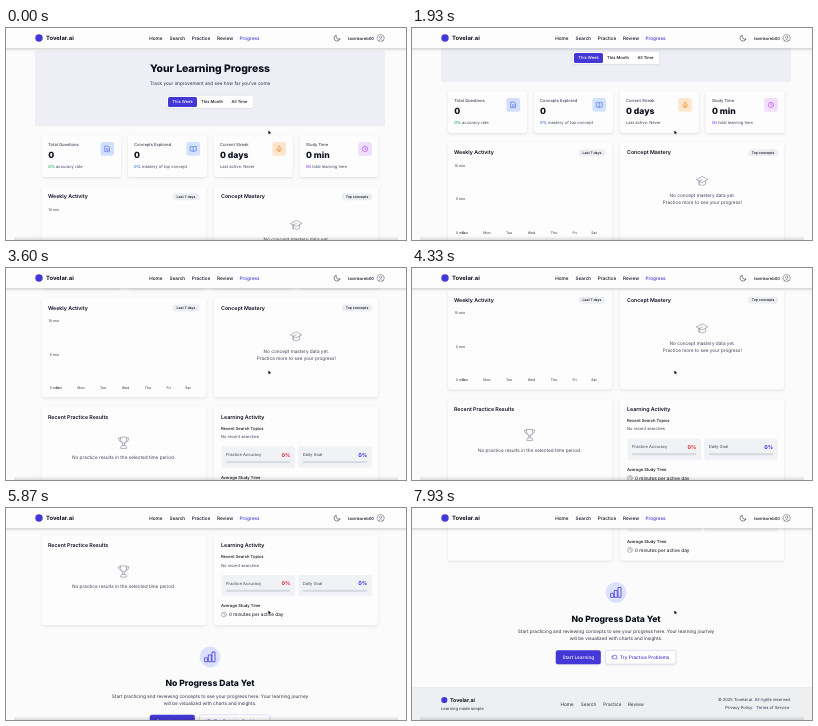
Recreate the animation shown at these times as an HTML page with a canvas. Size 400x212 px, loop 8000 ms.

```html
<!DOCTYPE html>
<html lang="en">
<head>
<meta charset="utf-8">
<title>Learning progress</title>
<style>
  html, body { margin: 0; width: 100%; height: 100%; overflow: hidden; background: #fbfbfc; }
  canvas { display: block; width: 400px; height: 212px; }
</style>
</head>
<body>
<canvas id="stage"></canvas>
<script>
const W = 400, H = 212, LOOP = 8000;
const INK = '#0b0f1a', BODY = '#2d3542', MUTED = '#3f4856', INDIGO = '#4338d6';
const BRAND = 'Tovelar.ai', USER = 'tavinkoreb00';
const XS = 3.5, SM = 4.1, BASE = 4.69, LG = 5.27, XL = 5.86, HUGE = 8.6;

const canvas = document.getElementById('stage');
const ctx = canvas.getContext('2d');
const ratio = window.devicePixelRatio || 1;
canvas.width = W * ratio;
canvas.height = H * ratio;

// Each flick of the page: start ms, end ms, scroll position reached.
const flicks = [
  [930, 1730, 44], [2000, 2600, 83], [3070, 3930, 136.5],
  [4400, 4870, 190], [5270, 5870, 240], [6270, 6930, 304.5]
];

function scrollAt(time) {
  let pos = 0;
  for (const [start, end, to] of flicks) {
    if (time <= start) break;
    const p = Math.min(1, (time - start) / (end - start));
    pos += (to - pos) * (1 - (1 - p) ** 2);
  }
  return pos;
}

// Text is placed by the vertical centre of its capitals.
function text(str, x, y, size, color = INK, weight = 400, align = 'left') {
  ctx.font = `${weight} ${size}px Inter, sans-serif`;
  ctx.textAlign = align;
  ctx.fillStyle = color;
  ctx.fillText(str, x, y + size * 0.36);
  return ctx.measureText(str).width;
}

const centered = (str, x, y, size, color, weight) => text(str, x, y, size, color, weight, 'center');

function box(x, y, w, h, r, fill, stroke) {
  ctx.beginPath();
  ctx.roundRect(x, y, w, h, r);
  if (fill) { ctx.fillStyle = fill; ctx.fill(); }
  if (stroke) { ctx.strokeStyle = stroke; ctx.lineWidth = 0.5; ctx.stroke(); }
}

function shadowed(draw, blur = 2.5, dy = 1, color = 'rgba(0,0,0,.1)') {
  ctx.save();
  ctx.shadowColor = color;
  ctx.shadowBlur = blur * ratio;
  ctx.shadowOffsetY = dy * ratio;
  draw();
  ctx.restore();
}

const card = (x, y, w, h) => shadowed(() => box(x, y, w, h, 3, '#fdfdfe'));

function disc(x, y, r, fill) {
  ctx.beginPath();
  ctx.arc(x, y, r, 0, Math.PI * 2);
  ctx.fillStyle = fill;
  ctx.fill();
}

function icon(path, x, y, color, width = 0.6, scale = 1) {
  ctx.save();
  ctx.translate(x, y);
  ctx.scale(scale, scale);
  ctx.strokeStyle = color;
  ctx.lineWidth = width / scale;
  ctx.lineJoin = ctx.lineCap = 'round';
  ctx.stroke(path);
  ctx.restore();
}

const icons = {
  page: new Path2D('M-2.2-2.8H.8L2.2-1.4V2.8H-2.2ZM-1 0H1M-1 1.3H1'),
  book: new Path2D('M0-2V2.5Q-1.5 1.7-3 2.1V-2.4Q-1.5-2.8 0-2Q1.5-2.8 3-2.4V2.1Q1.5 1.7 0 2.5'),
  flame: new Path2D('M0-2.8Q2.6-.9 2.2 1A2.3 2.3 0 0 1-2.2 1Q-2.4-.3-1.3-1.3Q-.6-1.2 0-2.8ZM0 0A1 1 0 1 0 .1 0'),
  clock: new Path2D('M2.7 0A2.7 2.7 0 1 1-2.7 0A2.7 2.7 0 1 1 2.7 0M0-1.6V0L1.1.7'),
  cap: new Path2D('M-5.6-1.6L0-4.6L5.6-1.6L0 1.4ZM-3.3-.3V3.2Q0 5.8 3.3 3.2V-.3M0-1.6L-3.2.2V4'),
  trophy: new Path2D('M-3-5.4H3V-2.4A3 3 0 0 1-3-2.4ZM-3-4.5H-5.3Q-5-.8-2.3-.7M3-4.5H5.3Q5-.8 2.3-.7M-1 .5V3M1 .5V3M-2.8 5.4V4.2Q-2.5 3-1 3H1Q2.5 3 2.8 4.2V5.4Z'),
  bars: new Path2D('M-5 1H-2.4V5H-5ZM-1.3-1.8H1.3V5H-1.3ZM2.4-4.8H5V5H2.4Z'),
  moon: new Path2D('M2.7 1.1A3 3 0 1 1-.9-2.8A2.9 2.9 0 0 0 2.7 1.1Z'),
  person: new Path2D('M3.6 0A3.6 3.6 0 1 1-3.6 0A3.6 3.6 0 1 1 3.6 0M1.2-.8A1.2 1.2 0 1 1-1.2-.8A1.2 1.2 0 1 1 1.2-.8M-2.3 2.6Q0 .1 2.3 2.6'),
  puzzle: new Path2D('M-2-1H-.8A.8.8 0 1 1 .8-1H2V2H-2V1.2A.8.8 0 1 1-2-.2Z')
};

function drawHero() {
  box(29, 22.5, 350, 75.5, 1.5, '#eeeef6');
  centered('Your Learning Progress', 204, 40, 10.4, INK, 800);
  centered('Track your improvement and see how far you\u2019ve come', 204, 55.3, BASE, BODY);
  shadowed(() => box(161, 68, 86, 12, 2, '#fff'), 1.5, 0.4);
  box(162, 69, 29, 10, 1.6, INDIGO);
  centered('This Week', 176.5, 74, SM, '#fff', 500);
  centered('This Month', 206, 74, SM, INK, 500);
  centered('All Time', 233.5, 74, SM, INK, 500);
}

const stats = [
  ['Total Questions', '0', '0%', ' accuracy rate', '#16a34a', 'page', '#d3defc', '#4a63e0'],
  ['Concepts Explored', '0', '0%', ' mastery of top concept', '#2f5fe8', 'book', '#d3e2fd', '#3f6be8'],
  ['Current Streak', '0 days', '', 'Last active: Never', MUTED, 'flame', '#fde6cc', '#f08a24'],
  ['Study Time', '0 min', '0h', ' total learning time', '#7c3aed', 'clock', '#f0defc', '#b04be8']
];

function drawStats() {
  stats.forEach(([label, value, lead, note, color, glyph, tint, line], i) => {
    const x = 36 + i * 85.9;
    card(x, 107.3, 79, 41.7);
    text(label, x + 6.2, 116.3, SM, MUTED, 500);
    text(value, x + 6.2, 127.2, HUGE, INK, 800);
    const shift = lead ? text(lead, x + 6.2, 139, SM, color, 500) : 0;
    text(note, x + 6.2 + shift, 139, SM, MUTED);
    box(x + 58.5, 114, 13.6, 13.8, 2.4, tint);
    icon(icons[glyph], x + 65.3, 120.9, line);
  });
}

function pill(str, cx, w) {
  box(cx - w / 2, 165.2, w, 7, 3.5, '#eceef2');
  centered(str, cx, 168.7, XS, INK, 500);
}

function drawCharts() {
  card(36, 158.5, 164, 99.5);
  text('Weekly Activity', 42, 168.5, LG, INK, 600);
  pill('Last 7 days', 180, 27);
  ['10 min', '5 min', '0 min'].forEach((s, i) => text(s, 53, 181.5 + i * 33.6, XS, BODY, 400, 'right'));
  const days = { Sun: 53, Mon: 75, Tue: 97, Wed: 119.5, Thu: 142, Fri: 162.5, Sat: 182 };
  for (const day in days) centered(day, days[day], 248.7, XS, BODY);

  card(208, 158.5, 164, 99.5);
  text('Concept Mastery', 215, 168.5, LG, INK, 600);
  pill('Top concepts', 351, 30.5);
  icon(icons.cap, 290.3, 197, '#9098a5', 0.7);
  centered('No concept mastery data yet.', 290.3, 211.7, BASE, MUTED);
  centered('Practice more to see your progress!', 290.3, 218.6, BASE, MUTED);
}

function meter(x, label, color) {
  box(x, 307, 73.6, 21.2, 2, '#f1f2f5');
  text(label, x + 4.6, 315.5, SM, MUTED);
  text('0%', x + 69, 315.5, LG, color, 700, 'right');
  box(x + 4.6, 321.8, 64.4, 1.9, 1, '#d4d8df');
}

function drawActivity() {
  card(36, 267.7, 164, 89.5);
  text('Recent Practice Results', 42, 277.5, LG, INK, 600);
  icon(icons.trophy, 117.6, 303.3, '#9098a5', 0.7);
  centered('No practice results in the selected time period.', 117.6, 318.4, BASE, MUTED);

  card(208, 267.7, 164, 89.5);
  text('Learning Activity', 215, 277.5, LG, INK, 600);
  text('Recent Search Topics', 215, 288.7, SM, INK, 500);
  text('No recent searches', 215, 297.5, SM, MUTED);
  meter(215.4, 'Practice Accuracy', '#ef2525');
  meter(292.2, 'Daily Goal', '#3a24e0');
  text('Average Study Time', 215, 338, SM, INK, 500);
  icon(icons.clock, 217.9, 346.5, '#6b7280', 0.5, 0.9);
  text('0 minutes per active day', 223, 346.5, BASE, INK);
}

function drawEmptyState() {
  disc(204, 389, 10.4, '#dbe1fc');
  icon(icons.bars, 204, 388.8, INDIGO, 0.8);
  centered('No Progress Data Yet', 204, 415.2, HUGE, INK, 800);
  centered('Start practicing and reviewing concepts to see your progress here. Your learning journey', 204, 428, BASE, BODY);
  centered('will be visualized with charts and insights.', 204, 435, BASE, BODY);
  shadowed(() => box(143.8, 446.7, 45, 14, 2, INDIGO), 2, 0.7);
  centered('Start Learning', 166.3, 453.5, BASE, '#fff', 500);
  shadowed(() => box(193.4, 446.9, 70.4, 13.6, 2, '#fff'), 2, 0.7);
  box(193.4, 446.9, 70.4, 13.6, 2, null, '#c9c9f5');
  icon(icons.puzzle, 202.8, 453.3, INDIGO);
  text('Try Practice Problems', 208, 453.5, BASE, INDIGO, 500);
}

function drawFooter() {
  ctx.fillStyle = '#edeff1';
  ctx.fillRect(0, 483.7, W, 60);
  ctx.fillStyle = '#dfe2e6';
  ctx.fillRect(0, 483.7, W, 0.4);
  disc(32.3, 496.5, 3.1, INDIGO);
  text(BRAND, 38, 496.5, LG, INK, 700);
  text('Learning made simple.', 29, 505.4, SM, BODY);
  const links = { Home: 155, Search: 176.5, Practice: 200.3, Review: 223.8 };
  for (const name in links) centered(name, links[name], 500.5, BASE, BODY);
  text(`\u00a9 2025 ${BRAND}. All rights reserved.`, 379, 496.3, SM, BODY, 400, 'right');
  text('Privacy Policy', 340.3, 504.5, SM, BODY, 400, 'right');
  text('Terms of Service', 377.3, 504.5, SM, BODY, 400, 'right');
}

function drawHeader() {
  shadowed(() => {
    ctx.fillStyle = '#fdfdfe';
    ctx.fillRect(-5, -5, W + 10, 25.2);
  }, 2.5, 0.8, 'rgba(0,0,0,.25)');
  disc(33, 10, 3.7, INDIGO);
  text(BRAND, 40, 10.2, XL, INK, 700);
  const links = { Home: 149.8, Search: 171.3, Practice: 195, Review: 219, Progress: 243.5 };
  for (const name in links) {
    centered(name, links[name], 10.2, BASE, name === 'Progress' ? INDIGO : INK, 500);
  }
  icon(icons.moon, 331.2, 10, '#30394a');
  text(USER, 368, 10.2, SM, INK, 500, 'right');
  icon(icons.person, 374.7, 10, '#586070', 0.5);
}

const bottomShade = ctx.createLinearGradient(0, 208, 0, H);
bottomShade.addColorStop(0, 'rgba(0,0,0,0)');
bottomShade.addColorStop(1, 'rgba(0,0,0,.13)');

function drawBottomShade() {
  ctx.fillStyle = bottomShade;
  ctx.fillRect(8, 208, W - 16, 4);
}

const pointer = new Path2D('M0 0V3.7L.9 2.9L1.5 4.2L2.1 3.9L1.5 2.7H2.7Z');

function drawPointer() {
  icon(pointer, 262.4, 102.4, '#fff', 0.6);
  ctx.save();
  ctx.translate(262.4, 102.4);
  ctx.fillStyle = '#000';
  ctx.fill(pointer);
  ctx.restore();
}

function render(time) {
  ctx.setTransform(ratio, 0, 0, ratio, 0, 0);
  ctx.textRendering = 'geometricPrecision';
  ctx.fillStyle = '#fbfbfc';
  ctx.fillRect(0, 0, W, H);
  ctx.save();
  ctx.translate(0, -scrollAt(time));
  drawHero();
  drawStats();
  drawCharts();
  drawActivity();
  drawEmptyState();
  drawFooter();
  ctx.restore();
  drawHeader();
  drawBottomShade();
  drawPointer();
}

const begin = performance.now();
function tick() {
  render((performance.now() - begin) % LOOP);
  requestAnimationFrame(tick);
}
tick();
</script>
</body>
</html>
```
